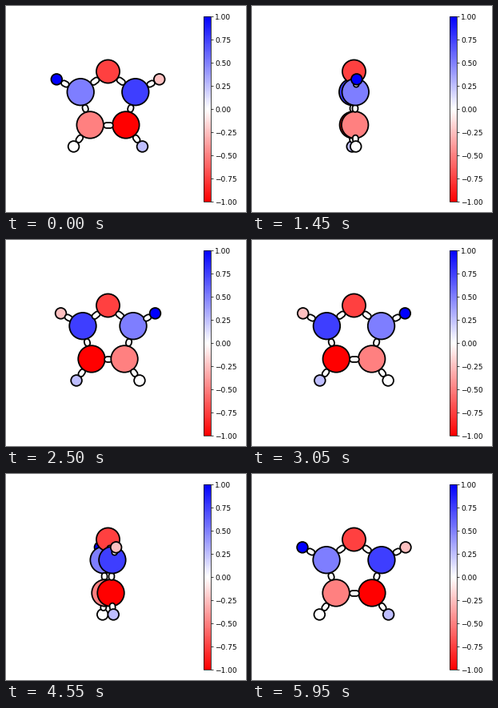
Write a matplotlib script that moves like this. It is 300 by 258 pixels and loops after 6 s.

```python
import numpy as np
import matplotlib.pyplot as plt
from matplotlib.animation import FuncAnimation
from matplotlib.cm import ScalarMappable
from matplotlib.colors import Normalize
from matplotlib.patches import Circle

W, H, DPI = 300, 258, 100
FRAMES, INTERVAL = 120, 50
STEP = 2 * np.pi / FRAMES
PT = 72 / DPI  # points per pixel
SCALE, CX, CY = 31.5, 127.5, 118.65
EDGE, STICK, INSET = 1.8, 5.1, 3.6

RADII = {"O": 0.66, "C": 0.76, "H": 0.31}
# element, x, y, charge
ATOMS = [
    ("O", 0.0, 1.1633, -0.75),
    ("C", -1.0947, 0.3480, 0.5),
    ("C", 1.0947, 0.3480, 0.75),
    ("C", -0.7132, -0.9621, -0.5),
    ("C", 0.7132, -0.9621, -1.0),
    ("H", -2.0494, 0.8511, 1.0),
    ("H", 2.0494, 0.8511, -0.25),
    ("H", -1.3708, -1.8197, 0.0),
    ("H", 1.3708, -1.8197, 0.25),
]
BONDS = [(0, 1), (0, 2), (1, 3), (2, 4), (3, 4), (1, 5), (2, 6), (3, 7), (4, 8)]

flat = np.array([[x, y, 0] for _, x, y, _ in ATOMS]) * SCALE
radii = np.array([RADII[a[0]] for a in ATOMS]) * 0.7 * SCALE
cmap, norm = plt.get_cmap("bwr_r"), Normalize(-1, 1)

fig = plt.figure(figsize=(W / DPI, H / DPI), dpi=DPI, facecolor="white")
ax = fig.add_axes([0, 0, 1, 1])
ax.set(xlim=(0, W), ylim=(H, 0))
ax.axis("off")

cax = fig.add_axes([247.1 / W, 1 - 245.2 / H, 8.4 / W, 232.2 / H])
levels = np.linspace(-1, 1, 9)
bar = fig.colorbar(ScalarMappable(norm, cmap), cax=cax, ticks=levels)
bar.ax.set_yticklabels([f"{v:.2f}".replace("-", "\u2212") for v in levels])
bar.outline.set_linewidth(0.72 * PT)
bar.ax.tick_params(labelsize=9.03 * PT, length=3.15 * PT, width=0.72 * PT,
                   pad=2.5 * PT)

balls = [ax.add_patch(Circle((0, 0), r, fc=cmap(norm(a[3])), ec="black",
                             lw=EDGE * PT))
         for a, r in zip(ATOMS, radii)]


def stroke(color, width):
    return ax.plot([], [], color=color, lw=width * PT,
                   solid_capstyle="round")[0]


sticks = [(stroke("black", STICK + 2 * EDGE), stroke("white", STICK))
          for _ in BONDS]


def project(p):
    return CX + p[0], CY - p[1]


def update(frame):
    t = (frame + 2) * STEP
    c, s = np.cos(t), np.sin(t)
    pos = flat @ np.array([[c, 0, -s], [0, 1, 0], [0, 0, c]])
    for ball, p in zip(balls, pos):
        ball.center = project(p)
        ball.set_zorder(1000 + p[2])
    for (i, j), pair in zip(BONDS, sticks):
        d = pos[j] - pos[i]
        d /= np.linalg.norm(d)
        a = pos[i] + d * (radii[i] + INSET)
        b = pos[j] - d * (radii[j] + INSET)
        depth = 1000 + (pos[i][2] + pos[j][2]) / 2
        for k, line in enumerate(pair):
            line.set_data(*zip(project(a), project(b)))
            line.set_zorder(depth + k * 1e-4)
    return balls


anim = FuncAnimation(fig, update, frames=FRAMES, interval=INTERVAL,
                     init_func=lambda: update(0), repeat=True,
                     repeat_delay=0, blit=False)
plt.show()
```
